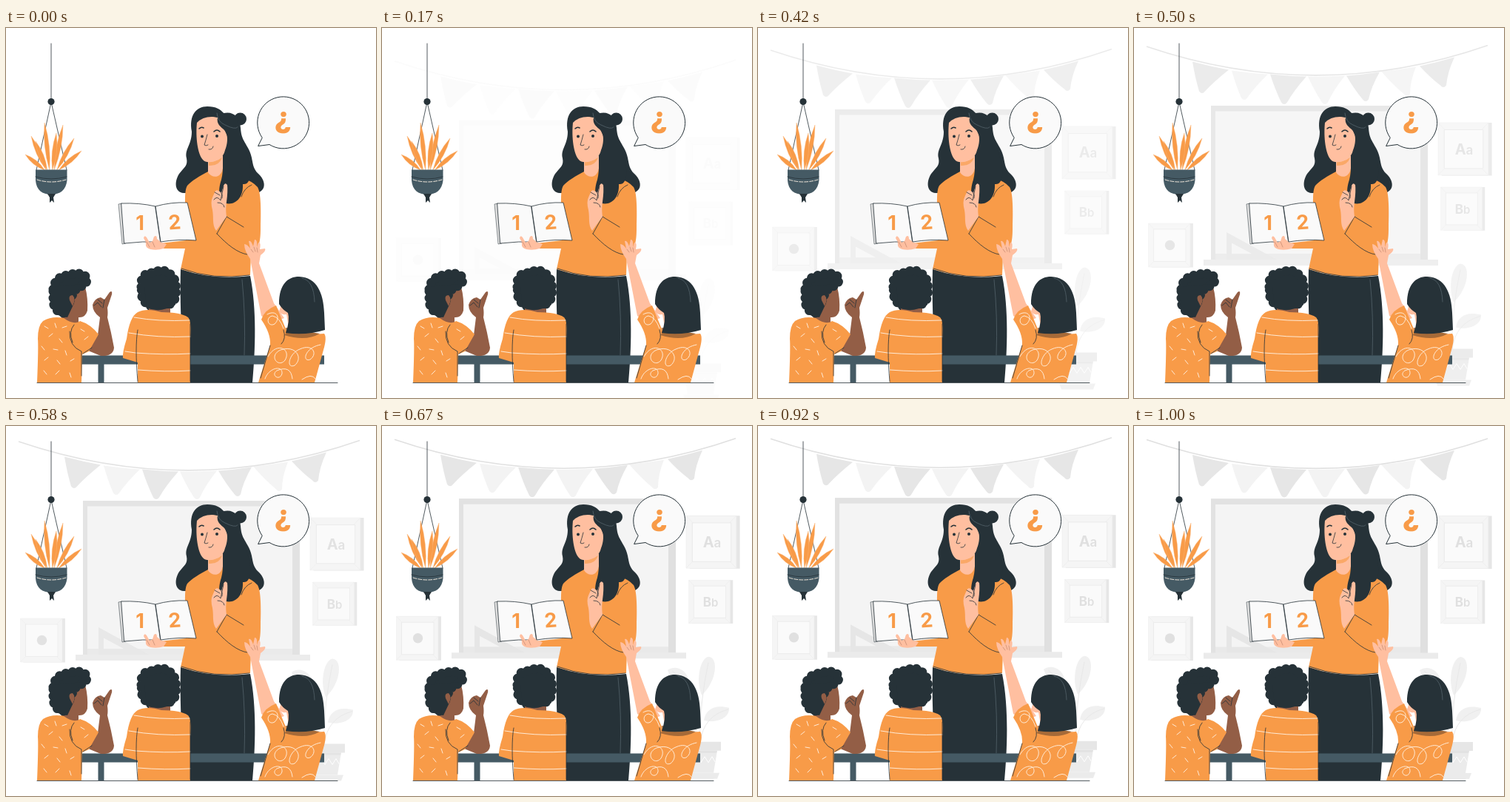
Animation, 500 px wide and 500 px high, one loop 1040 ms. Source, as an HTML page:

```html
<!DOCTYPE html>
<html lang="en">
<head>
<meta charset="utf-8">
<title>Lesson</title>
<style>
  html, body { margin: 0; width: 100%; height: 100%; overflow: hidden; background: #fff; }
  svg { display: block; width: 100%; height: 100%; }
  text { font-family: Inter, "Open Sans", sans-serif; font-weight: 700; text-anchor: middle; }
  .ink { fill: #263238; }
  .slate { fill: #455a64; }
  .orange { fill: #f89b48; }
  .skin { fill: #ffbfa0; }
  .brown { fill: #935e46; }
  .line { fill: none; stroke: #263238; stroke-width: .8; stroke-linecap: round; stroke-linejoin: round; }
  .white { fill: none; stroke: #fff3e6; stroke-width: .9; stroke-linecap: round; }
  .curls { fill: #263238; stroke: #263238; stroke-width: 13; stroke-linecap: round; stroke-dasharray: 0 9; }
  .limb { fill: none; stroke-linecap: round; stroke-linejoin: round; }
</style>
</head>
<body>
<svg viewBox="0 0 500 500">
  <defs>
    <g id="frame">
      <path fill="#e6e6e6" d="M4 0H61V60H4Z"/>
      <path fill="#f5f5f5" stroke="#efefef" stroke-width=".6" d="M0 0H57V59.500H0Z"/>
      <path fill="none" stroke="#ebebeb" stroke-width=".6" d="M0 0L57 59.500M57 0L0 59.500"/>
      <path fill="#fafafa" stroke="#e9e9e9" stroke-width=".8" d="M7 8H51V52H7Z"/>
    </g>
  </defs>

  <g id="back" opacity="0">
    <g id="flags"></g>
    <path fill="none" stroke="#e0e0e0" stroke-width="1.600" d="M17 18.500Q248 97 478 17"/>

    <path fill="#e0e0e0" d="M104 98.500H397V307H104Z"/>
    <path fill="#e9e9e9" d="M104 98.500H387V307H104Z"/>
    <path fill="#e2e2e2" d="M104 98.500H397V106H110V307H104Z"/>
    <path fill="#f4f4f4" d="M110 106H387V298.500H110Z"/>
    <path fill="#e6e6e6" fill-rule="evenodd" d="M125 269.500L193 306.500H125ZM132 284V299H160Z"/>
    <path fill="#ebebeb" d="M94 306.500H411V314.500H94Z"/>

    <use href="#frame" transform="translate(411 121.500) scale(1.190)"/>
    <use href="#frame" transform="translate(414.500 208.500) scale(.98)"/>
    <use href="#frame" transform="translate(19.500 257.500) scale(.99)"/>
    <g fill="#e0e0e0">
      <text x="446" y="164" font-size="20">A<tspan font-size="17" font-weight="600">a</tspan></text>
      <text x="444" y="244" font-size="17">B<tspan font-size="15" font-weight="600">b</tspan></text>
      <circle cx="48.500" cy="287" r="6.700"/>
    </g>

    <g fill="#f0f0f0">
      <path d="M386 330C396 323 412 328 415 346C400 350 390 343 386 330Z"/>
      <path d="M432 364C424 345 429 315 441 312C455 312 453 345 432 364Z"/>
      <path d="M435 398C437 383 450 376 469 381C470 396 450 402 435 398Z"/>
      <path fill="none" stroke="#e8e8e8" d="M441 320Q430 370 429 428M468 383Q434 392 430 428M392 331Q420 350 426 428"/>
    </g>
    <path fill="#e6e6e6" d="M403 427H458V439H403Z"/>
    <path fill="#ebebeb" d="M408 439H453L448 469H413Z"/>
    <path fill="#e2e2e2" d="M408 439H453L452 442H408Z"/>
    <path fill="none" stroke="#fff" d="M411 455l5-8 5 8 5-8 5 8 5-8 5 8 5-8 4 7"/>
    <path fill="#ebebeb" d="M407 469H456L453 477H410Z"/>
  </g>

  <!-- hanging plant -->
  <path class="line" d="M61 21V99M61 100L41 192M61 100L82 192" stroke-width=".7"/>
  <circle class="ink" cx="61" cy="99.500" r="4.600"/>
  <g id="leaves" class="orange"></g>
  <path class="slate" d="M40 191.500H82.500V206C81 219 73 225 61 225C49 225 41 219 40 206Z"/>
  <path class="line" d="M40 201Q61 207 82 201"/>
  <path class="white" stroke-dasharray="5 2" d="M42 205Q61 211 81 205"/>
  <path class="ink" d="M56 224H67L64 229L65 236L62 233L59 236V229Z"/>

  <!-- teacher -->
  <circle class="ink" cx="316.500" cy="123" r="8.500"/>
  <path class="ink" d="M251 140C247 118 257 106 272 106C284 106 290 110 294 115C307 112 316 120 317 135C318 150 322 152 328 164C335 178 331 186 340 196C352 206 352 221 338 223H240C228 222 227 208 234 197C241 188 246 186 244 176C241 164 251 158 251 140Z"/>
  <path class="orange" d="M273 194C262 200 251 206 245 213C239 222 244 255 243 287L208 291L211 298L242 298L236 326Q280 341 330 334L331 305C343 301 344 285 344 270C345 240 344 222 340 215Q333 207 320 203L292 190Z"/>
  <path class="skin" d="M273 180V195C278 203 290 204 293 190V172Z"/>
  <path class="orange" d="M274 181Q284 181 292 175Q288 187 274 186Z" opacity=".65"/>
  <path class="skin" d="M258 128C256 148 259 170 266 178C270 183 280 182 288 177C297 170 301 158 299 146L288 121Q268 117 258 128Z"/>
  <path class="ink" d="M256 127C262 116 275 119 286 121C284 130 290 133 296 139C301 146 299 158 296 165C291 180 295 190 291 205C287 217 286 231 297 237C310 240 321 229 320 211C332 213 334 190 324 168L312 125L285 110L260 113Z"/>
  <path class="line" d="M285 115Q286 127 296 131Q310 138 313 134" style="stroke:#53636a"/>
  <path class="line" stroke-width="1.800" d="M261 136Q264 133 267 135M281 140Q285 136 289 140" style="stroke-width:1.600"/>
  <circle class="ink" cx="265" cy="146.500" r="2"/>
  <circle class="ink" cx="285" cy="146" r="2"/>
  <path class="line" d="M272 144Q270 152 268 158Q270 160 273 158M274 164Q279 165 280 160"/>
  <path class="ink" d="M236 326Q280 341 330 335C339 380 337 435 333 479H249L240 445C236 400 235 360 236 326Z"/>
  <path class="line" d="M319 340Q324 390 322 442" style="stroke:#53636a"/>
  <path class="line" d="M237 325Q280 341 329 334M298 255L321 269M285 278C299 293 313 304 326 306M285 278L298 255M318 228Q322 216 332 212"/>
  <path class="skin" d="M284 274L298 255C297 247 297 243 298 235Q300 220 299 212Q296 208 294 213L291 223Q284 216 282 222L279 229Q276 235 279 246C281 257 278 265 284 274Z"/>
  <path class="line" d="M294 214L290 233Q285 226 281 232M291 223Q293 225 292 230M282 222L289 226M286 236Q294 236 295 242" stroke-width=".7"/>

  <!-- book and hand -->
  <path class="skin" d="M187 282L194 290L208 289L217 292L213 298Q204 301 195 299Q188 297 189 292Z"/>
  <path fill="#e0e0e0" stroke="#263238" stroke-width=".5" d="M152 238L157 237L162 291L157 292Z"/>
  <path class="line" d="M156 237Q180 236 202 241L209 289Q185 288 160 291ZM202 241Q223 235 245 236L257 287Q233 285 209 289Z" style="fill:#fafafa"/>
  <path class="skin" d="M186 284Q187 279 190 283L194 290L198 288L200 282Q204 279 204 285L209 289L206 297L193 298Q187 294 190 291Z"/>
  <path class="line" d="M190 289L194 296M198 289L201 296" style="stroke:#c98d74"/>
  <g class="orange" font-size="27">
    <text x="181" y="273">1</text>
    <text transform="translate(228.500 272) rotate(-4)">2</text>
  </g>

  <!-- question -->
  <path class="line" style="fill:#fafafa;stroke-width:1" d="M346 148A35 35 0 1 1 356 157.500L341 159.500Z"/>
  <text class="orange" x="374" y="135" font-size="40" style="font-weight:800">¿</text>

  <path class="slate" d="M102 442.500H430V454.500H132.500V479H124.500V454.500H102Z"/>

  <!-- left child -->
  <path class="brown" d="M77 360L107 350Q111 365 110 382Q107 392 98 391V402H74Z"/>
  <path class="curls" d="M64 353Q66 336 84 334Q104 328 110 339Q108 348 98 350Q90 356 88 366Q82 376 78 385Q66 384 64 370Z"/>
  <path class="ink" d="M60 350L104 346Q92 356 92 372L83 391Q68 390 64 382Z"/>
  <path class="brown" d="M86 368Q84 361 90 361Q95 366 90 376Z"/>
  <path class="brown" d="M111 436L124 415L127 391Q117 384 117 374Q120 365 128 364L133 367L140 357Q144 354 143 360L137 378Q138 386 137 391Q142 410 146 432Q145 444 128 443Z"/>
  <path class="line" d="M119 375L124 371L129 377M124 367L130 372M133 367L131 378" stroke-width=".7"/>
  <path class="orange" d="M50 396Q62 389 78 392Q92 402 100 396Q114 400 125 414L112 437L103 441L102 479H42Q44 430 43 420Q43 402 50 396Z"/>
  <path class="line" d="M86 410Q85 430 102 437V470M92 401Q84 410 90 425M104 440L116 432"/>
  <g id="flecks" class="white"></g>

  <!-- middle child -->
  <path class="curls" d="M183 350Q181 330 200 331Q214 322 227 338Q232 352 228 366Q220 378 206 377Q190 378 184 364Z"/>
  <path class="brown" d="M193 379H222V392H193Z"/>
  <path class="ink" d="M186 340H229V374Q208 386 190 378Z"/>
  <path class="orange" d="M178 384Q190 378 210 384Q236 384 246 391Q251 396 249 420V479H178V452L158 446Q157 439 163 420Q167 390 178 384Z"/>
  <path class="white" d="M173 391Q205 397 248 395M166 412Q205 419 249 417M161 437L175 439Q215 442 249 440M178 462Q215 465 249 463"/>
  <path class="line" d="M178 408Q174 430 178 478M249 400V478"/>

  <!-- right child -->
  <path class="skin" d="M345 389L330 312Q322 301 322 292Q326 292 330 298L328 288Q331 286 334 295L336 286Q340 285 339 296L341 290Q345 289 343 299L350 298Q352 301 344 307L342 318L362 372L376 392L358 398Z"/>
  <path class="line" d="M331 299L334 303M335 296L337 302M339 297L340 303" style="stroke:#c98d74"/>
  <path class="skin" d="M372 374L369 383Q372 388 379 387L382 404L392 400V374Z"/>
  <path class="orange" d="M345 394Q349 381 365 375Q372 392 379 409Q400 415 430 413Q434 418 429 435L417 479H341L357 428Q358 413 345 394Z"/>
  <path fill="#a66a38" d="M378 405Q380 413 376 415Q405 424 424 413Z"/>
  <path class="ink" d="M369 373C369 346 381 336 396 336C420 337 429 358 430 385L431 408Q405 416 378 412Q384 395 381 385Q373 380 369 373Z"/>
  <path class="line" d="M400 338Q416 341 417 370" style="stroke:#53636a"/>
  <path class="white" d="M353 387C365 380 372 391 363 400C354 405 350 391 360 389Q370 391 375 406M354 444C366 423 386 434 377 449C368 460 354 443 371 435C392 428 402 446 390 456C378 461 382 440 397 434C414 426 422 440 411 448C400 452 403 432 425 428M350 474C355 459 374 455 373 467C370 478 357 469 366 463Q385 455 387 474M400 475Q413 466 418 474"/>
  <path class="line" d="M375 408Q379 420 372 427M357 429L344 473"/>
  <path class="line" d="M42 479.500H448"/>
</svg>
<script>
  const $ = id => document.getElementById(id);

  // Each flag: left corner, right corner, tip
  const flags = [
    [79, 39, 128, 50, 92, 82], [132, 51, 181, 56, 149, 91], [184, 56, 233, 59, 203, 97],
    [235, 59, 285, 58, 258, 97], [287, 58, 332, 53, 313, 93], [334, 52, 381, 46, 369, 86],
    [386, 45, 433, 33, 418, 74]
  ];
  $('flags').innerHTML = flags.map(([ax, ay, bx, by, x, y], i) => {
    const fill = i % 2 ? '#f3f3f3' : '#e6e6e6';
    return `<path fill="${fill}" d="M${ax} ${ay}Q${(ax + bx) / 2} ${(ay + by) / 2 + 1} ${bx} ${by}` +
      `Q${(bx + x) / 2 - 2} ${(by + y) / 2} ${x + 4} ${y - 3}Q${x} ${y + 2} ${x - 4} ${y - 3}` +
      `Q${(ax + x) / 2 - 3} ${(ay + y) / 2} ${ax} ${ay}Z"/>`;
  }).join('');

  const tips = [[26, 171], [34, 146], [52, 128], [77, 131], [92, 149], [102, 166], [40, 153], [68, 142]];
  $('leaves').innerHTML = tips.map(([x, y], i) => {
    const base = 61 + (x - 61) * .25;
    const mx = base + (x - base) * .5, my = (192 + y) / 2;
    const len = Math.hypot(x - base, y - 192);
    const dx = (192 - y) / len * 6, dy = (x - base) / len * 6;
    return `<path stroke="#fbb67a" stroke-width=".4" d="M${base} 192Q${mx - dx} ${my - dy} ${x} ${y}Q${mx + dx} ${my + dy} ${base} 192Z"/>`;
  }).join('');

  const flecks = [
    [52, 403, 5, 3], [66, 399, 2, 6], [76, 405, 6, -2], [58, 417, 5, -4], [72, 420, 4, 5],
    [48, 430, 4, 5], [64, 434, 6, 1], [80, 436, 2, 6], [52, 449, 5, -4], [69, 449, 4, 5],
    [87, 450, 5, -3], [51, 463, 4, 5], [67, 468, 5, -5], [86, 466, 2, 6], [101, 407, 5, 3], [106, 421, 5, -4]
  ];
  $('flecks').innerHTML = flecks.map(([x, y, dx, dy]) => `<path d="M${x} ${y}l${dx} ${dy}"/>`).join('');

  // Bezier easing (.36, -.01, .5, 1.38): rises past its end and settles
  const curve = (s, a, b) => 3 * (1 - s) ** 2 * s * a + 3 * (1 - s) * s * s * b + s ** 3;
  function ease(t) {
    let lo = 0, hi = 1;
    for (let i = 0; i < 24; i++) {
      const mid = (lo + hi) / 2;
      if (curve(mid, .36, .5) < t) lo = mid; else hi = mid;
    }
    return curve(lo, -.01, 1.38);
  }

  const LOOP = 1040, FPS = 24;
  function draw(now) {
    const step = Math.floor((now % LOOP + 4) * FPS / 1000);
    const p = step ? Math.min(ease(Math.min((step + .5) / FPS, 1)), 1.055) : 0;
    $('back').setAttribute('opacity', Math.max(0, Math.min(p, 1)));
    $('back').setAttribute('transform', `translate(0 ${30 * (1 - p)})`);
    requestAnimationFrame(() => draw(performance.now() - start));
  }
  const start = performance.now();
  draw(0);
</script>
</body>
</html>
```
